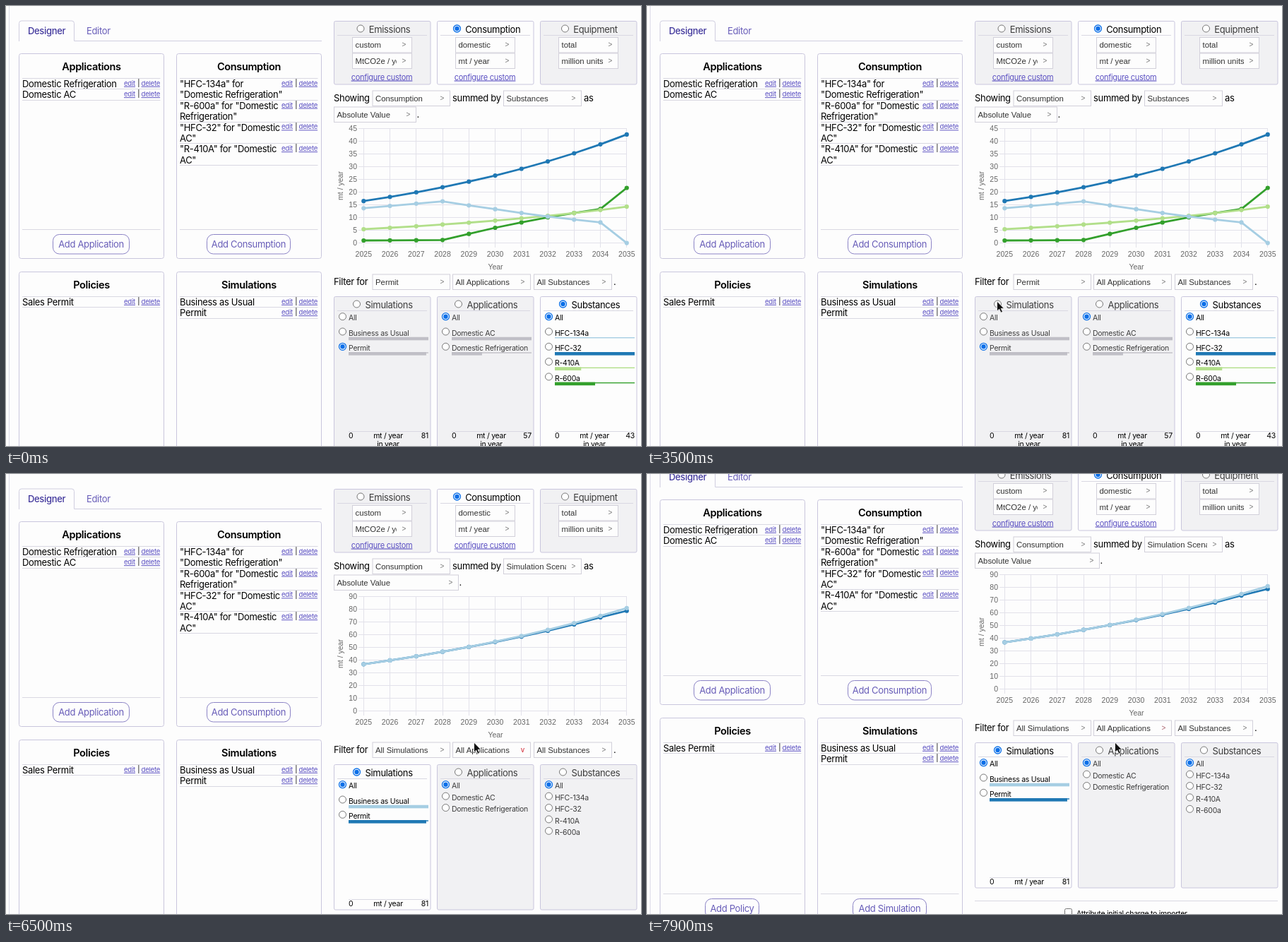
Animation, 899 px wide and 623 px high, one loop 8000 ms. Source, as an HTML page:

```html
<!DOCTYPE html>
<html lang="en">
<head>
<meta charset="utf-8">
<title>Simulation designer</title>
<style>
  html, body { margin: 0; width: 100%; height: 100%; overflow: hidden; background: #fdfdfd; }
  #stage { display: block; width: 100vw; height: 100vh; font: 13px Inter, sans-serif; }
  text { letter-spacing: -.025em; }
  .head { font-size: 14.5px; font-weight: 600; }
  .title { font-size: 19px; font-weight: 600; fill: #3f3594; }
  .tab { font-weight: 500; fill: #40369c; }
  .soft { fill: #675cb8; }
  .link { fill: #5b50c2; text-decoration: underline; font-size: 9.6px; }
  .link.big { font-size: 11px; }
  .bar { font-size: 10px; }
  .small { font-size: 10.5px; }
  .dim { fill: #3c3c3c; }
  .ui, .axis { font-family: "Liberation Sans", Arial, sans-serif; letter-spacing: 0; }
  .ui { font-size: 11.35px; fill: #333; }
  .arrow { font-size: 10px; fill: #777; }
  .axis { font-size: 10.5px; fill: #666; }
  .mid { text-anchor: middle; }
  .end { text-anchor: end; }
</style>
</head>
<body>
<svg id="stage" viewBox="0 0 899 623">
  <path d="M4.5 0V623" stroke="#dcdae8"/>
  <g id="page">
    <g id="fixed"></g>
    <g id="views"></g>
    <g id="chart"></g>
    <text id="appArrow" class="ui arrow mid" x="731.5" y="393.5"></text>
  </g>
  <circle id="click" r="16" fill="#777" fill-opacity=".42" stroke="#777" stroke-opacity=".45"/>
  <path id="cursor" d="M0 0V14L3.2 11.2L5.6 16.2L8 15.1L5.7 10.3H10Z" fill="#111" stroke="#fff" stroke-width=".8"/>
</svg>
<script>
const LOOP = 8000, DIMENSION_AT = 3650, ALL_AT = 4774;
const BORDER = '#c9c6dd', RULE = '#d9d8e2', GREY = '#c0bfc6';
const PALE_BLUE = '#a6cee3', BLUE = '#1f78b4', PALE_GREEN = '#b2df8a', GREEN = '#33a02c';
const $ = id => document.getElementById(id);

const text = (x, y, label, cls = '') => `<text x="${x}" y="${y}" class="${cls}">${label}</text>`;
const rule = (x1, x2, y, color = RULE) => `<path d="M${x1} ${y + .5}H${x2}" stroke="${color}"/>`;
const rect = (x, y, w, h, fill) => `<rect x="${x}" y="${y}" width="${w}" height="${h}" fill="${fill}"/>`;
const box = (x, y, w, h, r = 2, fill = '#fdfdfd', stroke = BORDER) =>
  `<rect x="${x + .5}" y="${y + .5}" width="${w - 1}" height="${h - 1}" rx="${r}" fill="${fill}" stroke="${stroke}"/>`;
const radio = (x, y, on) =>
  `<circle cx="${x}" cy="${y}" r="5" fill="#fff" stroke="${on ? '#0a6fe8' : '#767676'}" stroke-width="${on ? 1.3 : 1}"/>` +
  (on ? `<circle cx="${x}" cy="${y}" r="3.2" fill="#0a6fe8"/>` : '');

function select(x, y, w, label, arrow = true) {
  return box(x, y, w, 22.5, 0, '#fdfdfd', '#d2d0da') +
    `<svg x="${x}" y="${y}" width="${w - 22}" height="22">${text(4.5, 15, label, 'ui')}</svg>` +
    (arrow ? text(x + w - 11.5, y + 14, '&gt;', 'ui arrow mid') : '');
}

// Each row is a list of text lines.
function listPanel(x, y, title, rows, button, buttonWidth) {
  const mid = x + 103, left = x + 5, right = x + 200.5;
  let out = box(x, y, 206, 291, 3) + text(mid, y + 23.5, title, 'head mid') + rule(left, right, y + 35);
  let top = y + 35;
  for (const lines of rows) {
    lines.forEach((line, i) => out += text(left, top + 13 + i * 15.4, line));
    out += text(x + 149, top + 10.8, 'edit', 'link') + text(x + 169.7, top + 11, '|', 'bar mid') +
      text(x + 173.5, top + 10.8, 'delete', 'link');
    top += lines.length * 15.4;
    out += rule(left, right, Math.round(top));
  }
  return out + rule(left, right, y + 249) +
    box(mid - buttonWidth / 2 - .5, y + 256, buttonWidth, 28.5, 9, '#fdfdfd', '#8c84c6') +
    text(mid - .5, y + 274.5, button, 'soft mid');
}

function metric(x, radioX, title, first, second, on, link) {
  return box(x, 21, 137.5, 90.5, 2, on ? '#fdfdfd' : '#f1f1f3') + rule(x + 5, x + 132, 41) +
    radio(x + radioX, 32, on) + text(x + radioX + 11.7, 37.5, title, on ? '' : 'dim') +
    select(x + 26, 44, 85, first) + select(x + 26, 66.5, 85, second) +
    (link ? text(x + 68, 104.5, 'configure custom', 'link big mid') : '');
}

// Items are [label, bar share, colour]; without shares the rows close up.
function dimension(x, radioX, title, on, items, checked, max, withYear) {
  const bars = items[0][1] !== undefined, pitch = bars ? 21.3 : 16.4;
  const cls = on ? 'small' : 'small dim';
  let out = box(x, 411, 137.5, withYear ? 219 : 206.5, 2, on ? '#fdfdfd' : '#f1f1f3') +
    rule(x + 5, x + 132, 431) +
    radio(x + radioX, 422, on) + text(x + radioX + 12, 428, title, on ? '' : 'dim');
  [['All'], ...items].forEach(([label, share, color], i) => {
    const y = 441.2 + pitch * i;
    out += radio(x + 12.5, y - 1.5, i === checked) + text(x + 21, y + 4.2, label, cls);
    if (i && bars) out += rect(x + 21, y + 6.5, 113, 1.4, color) + rect(x + 21, y + 6.2, 113 * share, 4.6, color);
  });
  if (bars) {
    out += rule(x + 21, x + 134, 602) + text(x + 21, 612, '0', 'small') +
      text(x + 77, 612, 'mt / year', 'small mid') + text(x + 134, 612, max, 'small end');
    if (withYear) out += text(x + 77, 624, 'in year', 'small mid');
  }
  return out;
}

function view(bySimulation, simulation) {
  const wide = bySimulation ? 177 : 117;
  const shade = (share, color) => bySimulation ? [] : [share, color];
  const simColors = bySimulation ? [PALE_BLUE, BLUE] : [GREY, GREY];
  const year = !bySimulation;
  return select(704, 119.5, 111, bySimulation ? 'Simulation Scenarios' : 'Substances') +
    select(464, 142.5, wide, 'Absolute Value') + text(464 + wide + .5, 158, '.') +
    select(518.5, 379.5, 110.5, simulation ? 'Permit' : 'All Simulations') +
    dimension(464, 32.5, 'Simulations', bySimulation,
      [['Business as Usual', 1, simColors[0]], ['Permit', .973, simColors[1]]], simulation, 81, year) +
    dimension(610, 30.5, 'Applications', false,
      [['Domestic AC', ...shade(1, GREY)], ['Domestic Refrigeration', ...shade(.38, GREY)]], 0, 57, year) +
    dimension(756, 32.5, 'Substances', !bySimulation,
      [['HFC-134a', ...shade(0, PALE_BLUE)], ['HFC-32', ...shade(1, BLUE)],
       ['R-410A', ...shade(.33, PALE_GREEN)], ['R-600a', ...shade(.505, GREEN)]], 0, 43, year);
}

$('fixed').innerHTML =
  text(18, 0, 'Simulation', 'title') + text(464, 0, 'Results', 'title') +
  '<path d="M18.5 50V24.5Q18.5 21 22 21H93Q96.5 21 96.5 24.5V49.5H447" fill="none" stroke="#d0cee0"/>' +
  text(31, 40, 'Designer', 'tab') + text(114, 40, 'Editor', 'soft') +
  listPanel(18, 67, 'Applications', [['Domestic Refrigeration'], ['Domestic AC']], 'Add Application', 109) +
  listPanel(241, 67, 'Consumption', [
    ['"HFC-134a" for', '"Domestic Refrigeration"'], ['"R-600a" for "Domestic', 'Refrigeration"'],
    ['"HFC-32" for "Domestic', 'AC"'], ['"R-410A" for "Domestic', 'AC"']], 'Add Consumption', 119) +
  listPanel(18, 376, 'Policies', [['Sales Permit']], 'Add Policy', 77) +
  listPanel(241, 376, 'Simulations', [['Business as Usual'], ['Permit']], 'Add Simulation', 105) +
  metric(464, 38, 'Emissions', 'custom', 'MtCO2e / year', false, true) +
  metric(610, 28.5, 'Consumption', 'domestic', 'mt / year', true, true) +
  metric(756, 35.5, 'Equipment', 'total', 'million units', false, false) +
  text(464, 135, 'Showing') + select(518.5, 119.5, 110.5, 'Consumption') +
  text(632, 135, 'summed by') + text(818, 135, 'as') +
  text(464, 395, 'Filter for') + select(632, 379.5, 111, 'All Applications', false) +
  select(747, 379.5, 111, 'All Substances') + text(860, 395, '.') +
  rule(464, 893, 635) + box(591, 646, 11, 11, 2, '#fff', '#767676') +
  text(608, 656.5, 'Attribute initial charge to importer', 'small');

$('views').innerHTML = [view(false, 2), view(true, 2), view(true, 0)].map(v => `<g>${v}</g>`).join('');

const growth = (from, to) => Array.from({ length: 11 }, (_, i) => from * (to / from) ** (i / 10));
const usual = growth(36.8, 81);
const permitCut = [0, 0, 0, 0, .1, .3, .5, .8, 1, 1.2, 2.2];
const permit = usual.map((v, i) => v - permitCut[i]);

const charts = [
  { max: 45, step: 5, series: [
    [PALE_BLUE, [13.7, 14.6, 15.5, 16.4, 14.8, 13.3, 11.8, 10.4, 9.2, 8.1, 0]],
    [BLUE, growth(16.5, 42.7)],
    [PALE_GREEN, growth(5.45, 14.3)],
    [GREEN, [1, 1.05, 1.1, 1.2, 3.6, 6, 8.1, 10.1, 11.8, 13.4, 21.7]]] },
  { max: 80, step: 10, series: [[BLUE, permit]] },
  { max: 90, step: 10, series: [[PALE_BLUE, usual], [BLUE, permit]] }
];

function drawChart({ max, step, series }, rise) {
  const px = i => 506.3 + 37.25 * i, py = v => 335.6 - 162 * v / max;
  let out = '';
  for (let v = 0; v <= max; v += step) {
    const y = Math.round(py(v)) - .5;
    out += `<path d="M499 ${y}H879" stroke="#e2e1ea"/>` + text(497, y + 3.7, v, 'axis end');
  }
  for (let i = 0; i < 11; i++) {
    out += `<path d="M${Math.floor(px(i)) + .5} 173.5V342" stroke="#e2e1ea"/>` +
      text(px(i), 354.5, 2025 + i, 'axis mid');
  }
  out += text(693, 373, 'Year', 'axis mid') +
    '<text class="axis mid" transform="translate(477 254.5) rotate(-90)">mt / year</text>';
  for (const [color, values] of [...series].reverse()) {
    const points = values.map((v, i) => [px(i), py(v * rise)]);
    out += `<polyline points="${points.join(' ')}" fill="none" stroke="${color}" stroke-width="2.8" stroke-linejoin="round"/>` +
      points.map(([x, y]) => `<circle cx="${x}" cy="${y}" r="3.1" fill="${color}"/>`).join('');
  }
  $('chart').innerHTML = out;
}

// Rows are [time, ...values].
function along(keys, t, ease = p => p) {
  if (t <= keys[0][0]) return keys[0].slice(1);
  const next = keys.findIndex(k => k[0] > t);
  if (next < 0) return keys.at(-1).slice(1);
  const a = keys[next - 1], b = keys[next], p = ease((t - a[0]) / (b[0] - a[0]));
  return a.slice(1).map((v, i) => v + (b[i + 1] - v) * p);
}
const smooth = p => p * p * (3 - 2 * p);
const pointer = [
  [100, 550, -20], [600, 503, 34], [1100, 503, 34], [1500, 640, 34], [1700, 640, 34], [2100, 792, 34],
  [2900, 792, 34], [3400, 495.5, 418], [4100, 495.5, 418], [4600, 476, 443], [5300, 476, 443], [6200, 662.5, 380]
];
const scroll = [[6900, 0], [7400, 17], [7900, 31], [8000, 33]];
const during = (t, from, to) => t >= from && t < to;

let drawn = '';
function render(t) {
  const stage = t < DIMENSION_AT ? 0 : t < ALL_AT ? 1 : 2;
  const age = Math.min(1, (t - [-1000, DIMENSION_AT, ALL_AT][stage]) / 1000);
  const rise = 1 - (1 - age) ** 4;
  const key = stage + ':' + rise;
  if (key !== drawn) {
    drawChart(charts[stage], rise);
    [...$('views').children].forEach((g, i) => g.style.display = i === stage ? '' : 'none');
    drawn = key;
  }
  $('page').setAttribute('transform', `translate(0 ${-Math.round(along(scroll, t)[0])})`);

  const [x, y] = along(pointer, t, smooth);
  $('cursor').setAttribute('transform', `translate(${x} ${y})`);
  $('click').setAttribute('transform', `translate(${x - .5} ${y})`);
  $('click').style.display = during(t, 3580, 3850) || during(t, 4700, 5000) ? '' : 'none';

  const hover = during(t, 6100, 7850);
  $('appArrow').textContent = hover ? 'v' : '>';
  $('appArrow').style.fill = hover ? '#d0202c' : t >= 7850 ? '#a8606a' : '';
}

let start;
function tick(now) {
  start ??= now;
  render((now - start) % LOOP);
  requestAnimationFrame(tick);
}
render(0);
requestAnimationFrame(tick);
</script>
</body>
</html>
```
